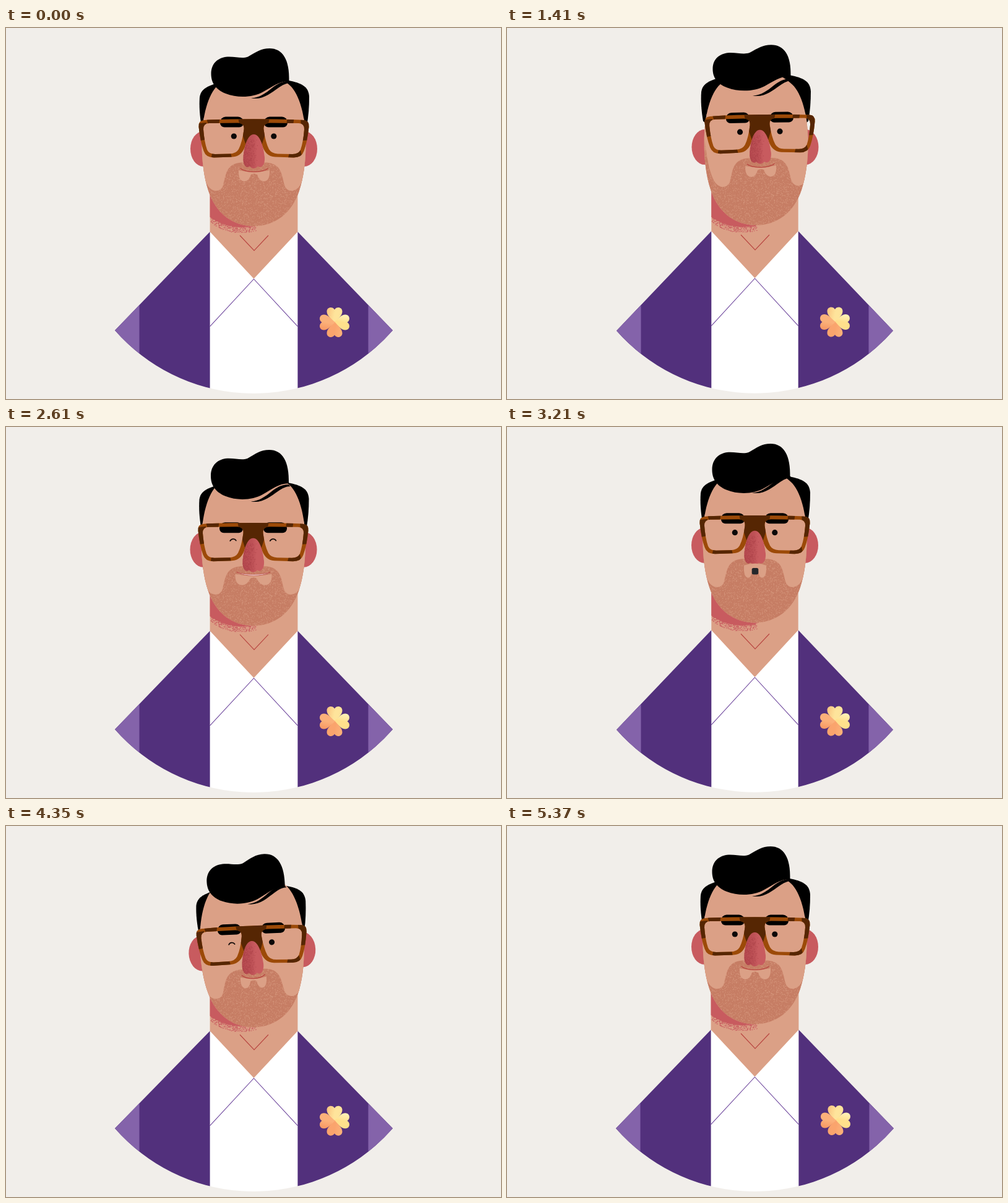
These frames come from a looping animation (800x600 px, 5.4 s). An HTML page with a canvas:

```html
<!DOCTYPE html>
<html lang="en">
<head>
<meta charset="utf-8">
<title>Man with glasses</title>
<style>
  html, body { margin: 0; width: 100%; height: 100%; overflow: hidden; background: #f1eeea; }
  canvas { display: block; width: 800px; height: 600px; }
</style>
</head>
<body>
<canvas id="stage" width="800" height="600"></canvas>
<script>
const ctx = document.getElementById('stage').getContext('2d');
const LOOP = 5400;
const SKIN = '#dba086', RED = '#c85b5f', BEARD = '#c67d64', LINE = '#b8443f';
const PURPLE = '#52307c', LILAC = '#8463aa', BROWN = '#9c4a08', DARK = '#562603';

// Poses: head offset and tilt, feature offset and tilt, hair, body, mouth.
const rest = { hx: 0, hy: 0, rot: 0, fx: 0, fy: 0, fr: 0, hairX: 0, hairY: 0, hairS: 1,
  strand: 0, body: 0, brow: 0, browTilt: 0, mouth: 22.5, o: 0, teeth: 0 };
const pose = (base, change) => ({ ...base, ...change });
const turn = pose(rest, { hx: .5, hy: -1.5, fx: 8, fy: -5.8, fr: -.9, hairX: .5, hairY: -1.5,
  hairS: .95, strand: -2.5, body: -1 });
const look = pose(turn, { hx: 0, rot: -.45, fr: -1.3, hairX: 0, hairY: -.5, hairS: .96,
  strand: -6, browTilt: -2 });
const grin = pose(rest, { hx: -.5, hy: 1, fx: -.5, fy: 6.8, hairY: 3, hairS: 1.025,
  strand: 6, body: .2, brow: 3, mouth: 27, teeth: 1 });
const gasp = pose(rest, { hy: -4, fy: -.3, hairY: -2, hairS: 1.025, strand: -3, body: -1,
  mouth: 0, o: 1 });
const wink = pose(rest, { hx: 2, hy: 5, rot: -2.2, fy: 9, hairY: 8, hairS: 1.01,
  strand: 7.5, body: 2, mouth: 18.5 });

const keys = [
  [60, rest],
  [650, pose(turn, { hairY: -.5 })],
  [870, turn],
  [1400, pose(turn, { hairY: -4.3 })],
  [1920, look],
  [2240, pose(look, { hairY: -3.7 })],
  [2580, grin],
  [2740, grin],
  [3000, pose(gasp, { hy: -7, hairY: -5 })],
  [3210, gasp],
  [3480, gasp],
  [4060, wink],
  [4560, wink],
  [5120, rest]
];

const clamp = v => Math.max(0, Math.min(1, v));
const smooth = v => v * v * (3 - 2 * v);

function poseAt(t) {
  const next = keys.findIndex(key => key[0] > t);
  if (next < 1) return rest;
  const [t0, a] = keys[next - 1], [t1, b] = keys[next];
  const k = smooth((t - t0) / (t1 - t0)), out = {};
  for (const name in rest) out[name] = a[name] + (b[name] - a[name]) * k;
  return out;
}

// 1 while open, 0 between start and end.
const openness = (t, start, end) => Math.max(clamp((start - t) / 90), clamp((t - end) / 90));

let seed = 7;
const random = () => (seed = (seed * 16807) % 2147483647) / 2147483647;

function grain(count, place) {
  const path = new Path2D();
  for (let i = 0; i < count; i++) {
    const [x, y] = place(), size = .6 + random() * .7;
    path.rect(x, y, size, size);
  }
  return path;
}

const between = (a, b) => a + random() * (b - a);
const shadowEdge = x => 190 + 132 * Math.sqrt(1 - ((x - 380) / 105) ** 2);
const beardGrain = grain(3600, () => [between(318, 484), between(192, 322)]);
const noseGrain = grain(420, () => [
  383 + 24 * random() * Math.sqrt(random()), between(180, 224)]);
const neckGrain = grain(620, () => {
  const x = between(330, 404);
  return [x, shadowEdge(x) - 2 + 11 * random() ** 2];
});

const shapes = {
  face: new Path2D('M400.5 70C420 70 440 75 459 93C474 107 484.5 142 484.5 187' +
    'C484.5 215 481 242 474 263C462 300 434 320.5 400.5 320.5' +
    'C367 320.5 339 300 327 263C320 242 316.5 215 316.5 187C316.5 142 327 107 342 93' +
    'C361 75 381 70 400.5 70Z'),
  hair: new Path2D('M457.5 86C441 86 431 95 415 103.5C400 112 375 114 355 106' +
    'C338 99 331.5 88 331.5 74C331.5 57 343 47.5 358 46.5C372 46 381 50 391 46.5' +
    'C404 39 412 33 426 33C447 33 458.5 51 457.5 86Z'),
  sides: new Path2D('M316 159C313 142 312 126 313 112C315 98 326 94 342 89L457 85' +
    'C477 89 489 94 490 111C490 127 489 142 486 159L474 170L328 170Z'),
  strand: new Path2D('M396 113.5C415 117 428 105 440 97C447 92 453 89 460 89L457 86' +
    'C445 86 438 91 430 97C420 105 410 113 396 113.5Z'),
  cheeks: new Path2D('M310 145C312 210 316 234 325 253C332 266 347 267 351 254' +
    'C355 238 356 226 369 220C379 216 389 218 400.5 218C412 218 422 216 432 220' +
    'C445 226 446 238 450 254C454 267 469 266 476 253C485 234 489 210 491 145Z'),
  nose: new Path2D('M400.5 172C391 172 385 190 383.5 209C382.5 222 389 228 394 223.5' +
    'C397 228 404 228 407 223.5C412 228 419 222 418 209C416 190 410 172 400.5 172Z'),
  leaf: new Path2D('M0 1C-6 -6 -12.5 -11 -12.5 -17.5C-12.5 -25 -3 -26 0 -20.5' +
    'C3 -26 12.5 -25 12.5 -17.5C12.5 -11 6 -6 0 1Z')
};

const lens = 'M319 164Q318.5 154.5 328 154L374 153.5Q385.5 153.5 384.5 164Q382 184 376 196' +
  'Q372 203 362 203.5L338 204Q328 204 325 197Q320.5 184 319 164Z';
const rim = 'M311.5 160Q310.5 149.5 320 149Q345 147.3 400.5 147.3L400.5 173C394 173 390 180 387.5 188' +
  'C384 201 377 208 366 208.5L336 209.5Q323 209.5 319.5 199Q314 184 311.5 160Z';
const half = new Path2D(rim + lens);
const frame = new Path2D();
frame.addPath(half);
frame.addPath(half, new DOMMatrix([-1, 0, 0, 1, 801, 0]));

function fill(color, path, rule) {
  ctx.fillStyle = color;
  ctx.fill(path, rule || 'nonzero');
}

function trace(points) {
  ctx.beginPath();
  points.forEach(([x, y]) => ctx.lineTo(x, y));
}

function polygon(color, points) {
  trace(points);
  ctx.fillStyle = color;
  ctx.fill();
}

function polyline(color, width, points) {
  trace(points);
  ctx.strokeStyle = color;
  ctx.lineWidth = width;
  ctx.stroke();
}

function box(color, x0, y0, x1, y1) {
  ctx.fillStyle = color;
  ctx.fillRect(x0, y0, x1 - x0, y1 - y0);
}

function ellipse(color, x, y, rx, ry) {
  ctx.beginPath();
  ctx.ellipse(x, y, rx, ry, 0, 0, 2 * Math.PI);
  ctx.fillStyle = color;
  ctx.fill();
}

function group(draw) {
  ctx.save();
  draw();
  ctx.restore();
}

function turnAround(x, y, degrees) {
  ctx.translate(x, y);
  ctx.rotate(degrees * Math.PI / 180);
  ctx.translate(-x, -y);
}

function clover(x, y) {
  const light = ['#fee49b', '#ffe08c', '#faa46d', '#fbb17a'];
  const deep = ['#fbc984', '#fff0b4', '#fbb178', '#f89b66'];
  for (let i = 0; i < 4; i++) group(() => {
    ctx.translate(x, y);
    ctx.rotate(i * Math.PI / 2);
    const tone = ctx.createLinearGradient(-11, -14, 9, -10);
    tone.addColorStop(0, deep[i]);
    tone.addColorStop(.55, light[i]);
    tone.addColorStop(1, light[i]);
    fill(tone, shapes.leaf);
  });
}

function drawBody(p) {
  const inset = Math.max(0, -p.body), top = 329.5 + p.body;
  const left = 176 + inset, right = 625 - inset;
  const inner = 329.6 + inset * .7, outer = 471.4 - inset * .7;
  group(() => {
    const corner = 489 + inset * .6, a = Math.asin(224.5 / 298);
    ctx.beginPath();
    ctx.moveTo(inner, top);
    ctx.lineTo(left, corner);
    ctx.arc(400.5, 293, 298 - inset * .3, Math.PI / 2 + a, Math.PI / 2 - a, true);
    ctx.lineTo(right, corner);
    ctx.lineTo(outer, top);
    ctx.closePath();
    ctx.clip();
    box('#fff', inner - 1, 320, outer + 1, 600);
    box(PURPLE, 170, 320, inner, 590);
    box(PURPLE, outer, 320, 630, 590);
    box(LILAC, 170, 430, 215.5 + inset, 550);
    box(LILAC, 585.5 - inset, 430, 630, 550);
  });
  polygon(SKIN, [[inner, 235], [outer, 235], [outer, top], [400.5, top + 76], [inner, top]]);
  polyline('#6d459c', 1.1, [[inner, top + 153.2], [400.5, top + 76.5], [outer, top + 153.2]]);
  polyline(LINE, 1.1, [[378, top + 6], [401, top + 30.5], [424, top + 6]]);
  clover(531 - inset, 476 + p.body * .4);

  group(() => {
    ctx.beginPath();
    ctx.rect(inner, 235, outer - inner, top - 233);
    ctx.clip();
    ctx.translate(0, p.hy * .3);
    ellipse(RED, 380, 190, 105, 132);
    fill(RED, neckGrain);
  });
}

function drawEye(x, open) {
  if (open > .35) {
    ellipse('#0b0808', x, 175, 4.6, 4.6 * open);
    return;
  }
  ctx.beginPath();
  ctx.moveTo(x - 5, 176.3);
  ctx.bezierCurveTo(x - 3, 172.3, x + 2.5, 172.3, x + 4.5, 175.8);
  ctx.strokeStyle = '#160d0b';
  ctx.lineWidth = 1.8;
  ctx.lineCap = 'round';
  ctx.stroke();
}

function drawMouth(p) {
  group(() => {
    ctx.translate(401, 0);
    const w = p.mouth + 2.5 + p.o * 15.5, side = 230 - p.o * 2;
    ctx.beginPath();
    ctx.moveTo(-w, side);
    ctx.quadraticCurveTo(-w - 1, 248, -w * .6, 248);
    ctx.quadraticCurveTo(-w * .32, 247, -5, 237);
    ctx.quadraticCurveTo(0, 234, 5, 237);
    ctx.quadraticCurveTo(w * .32, 247, w * .6, 248);
    ctx.quadraticCurveTo(w + 1, 248, w, side);
    ctx.quadraticCurveTo(0, 236 - p.o * 14, -w, side);
    ctx.fillStyle = SKIN;
    ctx.fill();
    if (p.mouth > 3) {
      const m = p.mouth, y = 227, lip = y + 7.5 - p.teeth * 2.6;
      ctx.beginPath();
      ctx.moveTo(-m, y);
      ctx.bezierCurveTo(-m * .55, y + 7.5, m * .55, y + 7.5, m, y);
      if (p.teeth > .05) {
        ctx.bezierCurveTo(m * .5, lip, -m * .5, lip, -m, y);
        ctx.fillStyle = '#fff';
        ctx.fill();
      }
      ctx.strokeStyle = LINE;
      ctx.lineWidth = 1.3 - p.teeth * .5;
      ctx.stroke();
    }
    if (p.o > .25) {
      const r = 5.3 * p.o;
      ctx.beginPath();
      ctx.roundRect(-r, 237.5 - r, r * 2, r * 2, r * .5);
      ctx.fillStyle = '#25272b';
      ctx.fill();
    }
  });
}

function drawGlasses() {
  group(() => {
    fill(BROWN, frame, 'evenodd');
    ctx.clip(frame, 'evenodd');
    polygon(DARK, [[374, 140], [427, 140], [423, 160], [413, 190], [388, 190], [378, 160]]);
    polygon(DARK, [[305, 155], [324, 153], [325, 180], [305, 184]]);
    polygon(DARK, [[334, 198], [362, 198], [366, 214], [331, 214]]);
    polygon(DARK, [[323, 143], [346, 143], [344, 157], [327, 157]]);
    polygon(DARK, [[476, 143], [498, 143], [498, 181], [478, 182]]);
    polygon(DARK, [[455, 143], [466, 143], [464, 157], [453, 157]]);
    polygon(DARK, [[459, 198], [476, 198], [480, 214], [455, 214]]);
  });
}

function drawFace(p, leftOpen, rightOpen) {
  const brow = (x, y) => {
    ctx.beginPath();
    ctx.roundRect(x, y, 38, 17, [9, 9, 7, 7]);
    ctx.fillStyle = '#000';
    ctx.fill();
  };
  brow(346, 143.5 + p.brow);
  brow(417, 143.5 + p.brow + p.browTilt);
  drawEye(368.3, leftOpen);
  drawEye(432.8, rightOpen);
  drawGlasses();
  group(() => {
    fill(RED, shapes.nose);
    ctx.clip(shapes.nose);
    const shade = ctx.createLinearGradient(383, 0, 418, 0);
    shade.addColorStop(0, 'rgba(165,58,65,.45)');
    shade.addColorStop(.45, 'rgba(165,58,65,.3)');
    shade.addColorStop(.65, 'rgba(165,58,65,0)');
    box(shade, 380, 170, 422, 230);
    fill('rgba(155,52,60,.45)', noseGrain);
  });
  drawMouth(p);
}

function drawHead(p, leftOpen, rightOpen) {
  ctx.translate(p.hx, p.hy);
  turnAround(400, 320, p.rot);
  const earY = 195.5 + p.fy * .25;
  ellipse(RED, 319, earY, 21, 28.5);
  ellipse(RED, 482, earY, 21, 28.5);

  group(() => {
    ctx.translate(p.hairX, p.hairY + (p.hairS - 1) * 53);
    fill('#000', shapes.sides);
  });

  const toFace = () => {
    ctx.translate(p.fx, p.fy);
    turnAround(400.5, 190, p.fr);
  };
  group(() => {
    const lean = p.fx * .2;
    ctx.translate(lean, 0);
    fill(SKIN, shapes.face);
    ctx.clip(shapes.face);
    ctx.translate(-lean, 0);
    const fade = ctx.createLinearGradient(0, 180, 0, 212);
    fade.addColorStop(0, 'rgba(198,125,100,0)');
    fade.addColorStop(1, BEARD);
    box(fade, 310, 180, 500, 325);
    fill('rgba(222,166,139,.6)', beardGrain);
    toFace();
    fill(SKIN, shapes.cheeks);
  });

  group(() => {
    ctx.translate(p.hairX, p.strand);
    fill('#000', shapes.strand);
  });
  group(() => {
    ctx.translate(p.hairX, 33 + p.hairY);
    ctx.scale(1, p.hairS);
    ctx.translate(0, -33);
    fill('#000', shapes.hair);
  });
  group(() => {
    toFace();
    drawFace(p, leftOpen, rightOpen);
  });
}

function render(now) {
  const t = now % LOOP, p = poseAt(t);
  const blink = openness(t, 2430, 2850);
  box('#f1eeea', 0, 0, 800, 600);
  drawBody(p);
  group(() => drawHead(p, Math.min(blink, openness(t, 4080, 4640)), blink));
}

const start = performance.now();
function tick() {
  render(performance.now() - start);
  requestAnimationFrame(tick);
}
tick();
</script>
</body>
</html>
```
